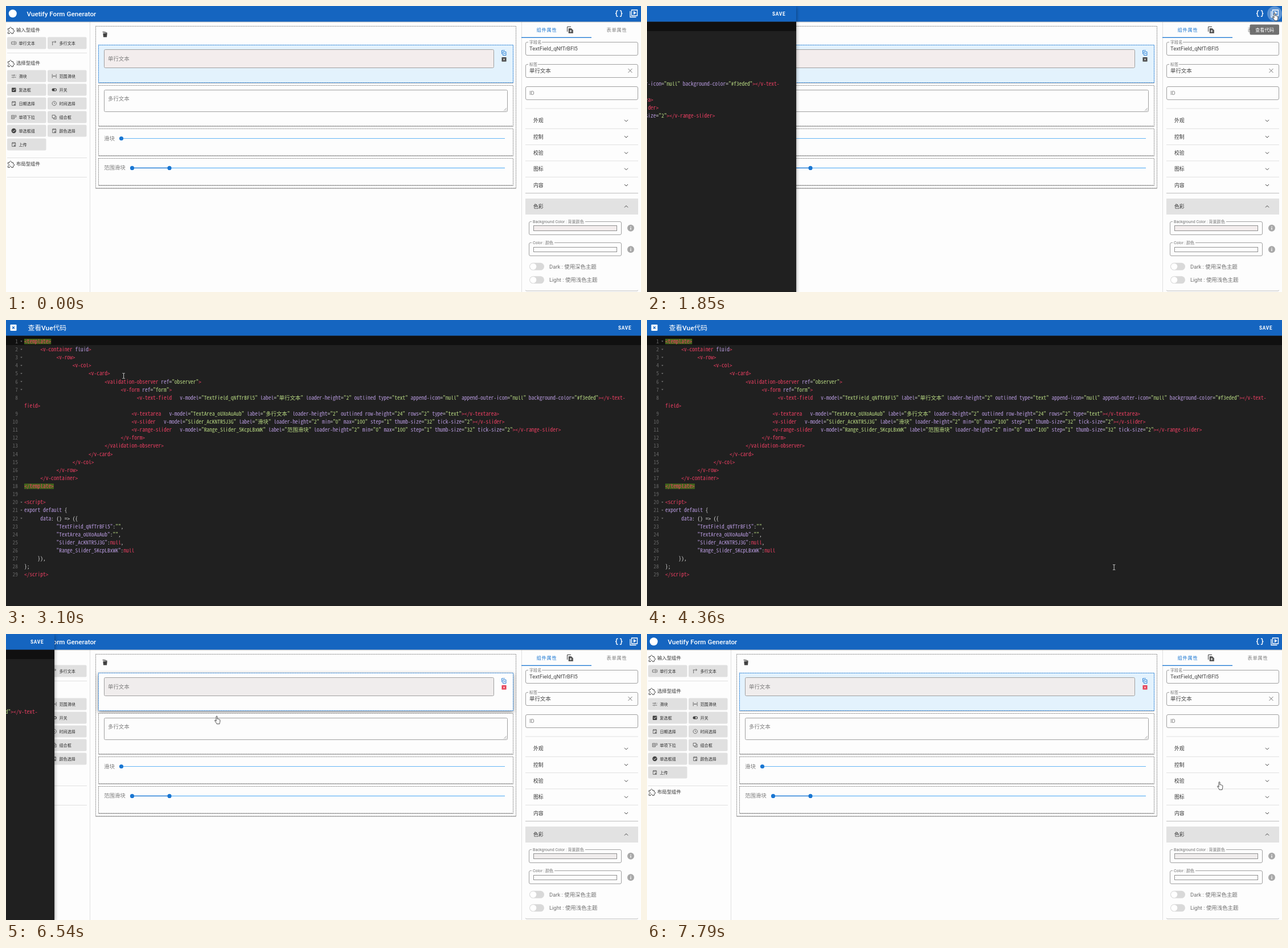
An HTML page for the animation above (8000 ms loop, 1115x502 px).

```html
<!DOCTYPE html>
<html lang="zh-CN">
<head>
<meta charset="utf-8">
<title>Form Generator</title>
<style>
  html, body { margin: 0; width: 100%; height: 100%; overflow: hidden; background: #fdfdfd; }
  svg { display: block; }
  text { font-family: Roboto, "Noto Sans CJK SC", "Noto Sans CJK", sans-serif; white-space: pre; }
  .code text { font-family: "Noto Sans Mono CJK SC", "Noto Sans Mono", monospace; font-size: 9.44px; }
  .shadow { filter: drop-shadow(0 1px .7px rgba(0,0,0,.25)); }
  .lift { filter: drop-shadow(0 2px 3px rgba(0,0,0,.45)); }
</style>
</head>
<body>
<svg id="stage" width="1115" height="502" viewBox="0 0 1115 502" xmlns="http://www.w3.org/2000/svg"></svg>
<script>
const BLUE = '#1565c0', PRIMARY = '#1976d2', INK = '#424242', GREY = '#7c7c7c', EDGE = '#a0a0a0', PAPER = '#fdfdfd';

const esc = s => s.replace(/&/g, '&amp;').replace(/</g, '&lt;');
const rect = (x, y, w, h, fill, more = '') =>
  `<rect x="${x}" y="${y}" width="${w}" height="${h}" fill="${fill}" ${more}/>`;
const line = (x1, y1, x2, y2, color, w = 1) =>
  `<path d="M${x1} ${y1}L${x2} ${y2}" stroke="${color}" stroke-width="${w}"/>`;
const dot = (x, y, r, fill) => `<circle cx="${x}" cy="${y}" r="${r}" fill="${fill}"/>`;
const text = (x, y, s, size, fill, more = '') =>
  `<text x="${x}" y="${y}" font-size="${size}" fill="${fill}" ${more}>${esc(s)}</text>`;
const group = (id, body, more = '') => `<g id="${id}" ${more}>${body}</g>`;
const icon = (x, y, d, color = INK, fill = 'none', w = 1) =>
  `<path transform="translate(${x} ${y})" d="${d}" fill="${fill}" stroke="${color}" stroke-width="${w}"/>`;

const SPACED = 'font-weight="500" letter-spacing=".74"';

// Icons are centred on 0,0
const shape = {
  puzzle: 'M-5-3h3c-1-3 4-3 3 0h3v3c3-1 3 4 0 3v3h-3c1-3-4-3-3 0h-3v-3c3 1 3-4 0-3z',
  field: 'M0-2h-4v4h4M1-3.5v7M2-2h2v4h-2',
  area: 'M-3 4v-6h6M1-4l2 2-2 2M-4-2h1',
  slide: 'M-4-1.5h5M3-1.5h1M1-3v3M-4 2h2M0 2h4M-1 .5v3',
  range: 'M-3.5-3.5v7M3.5-3.5v7M-2 0h4M-1-1l-1 1 1 1M1-1l1 1-1 1',
  date: 'M-3-3h6v6.5h-6zM-3-2h6M-1.7-4v1M1.7-4v1M.5 1h1.5v1.5h-1.5z',
  clock: 'M0-3.7a3.7 3.7 0 1 0 .1 0M0-2v2l1.6 1',
  list: 'M-4-3h5v6h-5zM-3-1h3M-3 1h3M2-3h2v3h-2',
  combo: 'M-3.5-3.5h5v5h-5zM-1 2v1.5h4.5v-5h-1.5',
  copy: 'M-1.5-1.5h5.5v6h-5.5zM-3.5 2.5v-6.5h5.5M0 1.5h3',
  cross: 'M-2-2l4 4M2-2l-4 4',
  brace: 'M3-5h-1.2q-1.4 0-1.4 1.4v1.800q0 1.800-1.800 1.800 1.800 0 1.800 1.800v1.800q0 1.400 1.400 1.400h1.200',
  down: 'M-3-1.5l3 3 3-3',
  up: 'M-3 1.5l3-3 3 3'
};

function tool(x, y, kind, label) {
  let mark;
  if (kind === 'check') mark = rect(x + 8, y - 3.5, 7.5, 7.5, INK, 'rx="1"') + icon(x + 11.7, y, 'M-2 0l1.5 1.5 3-3', '#fff');
  else if (kind === 'radio') mark = dot(x + 11.7, y, 4.2, INK) + icon(x + 11.7, y, 'M-2 0l1.5 1.5 3-3', '#fff');
  else if (kind === 'switch') mark = rect(x + 7.5, y - 2.5, 8.5, 5, INK, 'rx="2.5"') + dot(x + 13.4, y, 1.5, '#e0e0e0');
  else mark = icon(x + 11.7, y, shape[kind], '#555', 'none', .8);
  return rect(x, y - 10.5, 68.5, 21, '#e0e0e0', 'rx="2"') + mark + text(x + 20.5, y + 2.6, label, 7.08, '#2a2a2a');
}

function sidebar() {
  const rows = [
    [65, 'field', '单行文本', 'area', '多行文本'],
    [123, 'slide', '滑块', 'range', '范围滑块'],
    [147, 'check', '复选框', 'switch', '开关'],
    [171, 'date', '日期选择', 'clock', '时间选择'],
    [195, 'list', '单项下拉', 'combo', '组合框'],
    [219, 'radio', '单选框组', 'date', '颜色选择'],
    [243, 'date', '上传']
  ];
  let out = line(147.5, 28, 147.5, 502, '#e0e0e0');
  for (const [y, s] of [[42, '输入型组件'], [100, '选择型组件'], [277, '布局型组件']])
    out += icon(8.5, y + .5, shape.puzzle, INK, 'none', .9) + text(18, y + 3.2, s, 8.4, '#333');
  for (const y of [82.5, 266.5, 300.5]) out += line(2, y, 142, y, '#e0e0e0');
  for (const [y, a, s, b, t] of rows) out += tool(2, y, a, s) + (b ? tool(73, y, b, t) : '');
  return out;
}

// The shadow lies under a plain sheet, so the gaps between the dashes stay clear
const sheet = (x, y, w, h, edge = '#8a8a8a', fill = PAPER, ids = ['', '']) =>
  rect(x, y, w + 1, h + 1, fill, `class="shadow" ${ids[0]}`) +
  rect(x + .5, y + .5, w, h, 'none', `stroke="${edge}" stroke-dasharray="2 1" ${ids[1]}`);

function canvasArea() {
  const track = (x, y) => line(x, y, 876, y, '#64b5f6', 1.1);
  return sheet(157, 35, 738, 284) +
    icon(174, 49.5, 'M-3.5-1.5h7l-.6 6.5h-5.8zM-4-4.5l7.5 1.8-.3 1-7.5-1.8zM-1.5-5l2.5.6', INK, INK, .3) +
    sheet(162, 68, 728, 66, PRIMARY, '#e3f2fd', ['id="rowBox"', '']) +
    rect(172.5, 76.5, 684, 32, '#f3eded', `class="tint" rx="2" stroke="${EDGE}"`) +
    text(179, 95.5, '单行文本', 9.44, GREY) +
    icon(874, 82, shape.copy, PRIMARY, 'none', .9) +
    rect(870.5, 90, 8, 7.6, INK, 'id="remove" rx=".6"') + icon(874.5, 93.8, 'M-1.8-1.8l3.6 3.6M1.8-1.8l-3.6 3.6', '#fff') +
    sheet(162, 139, 728, 71) + rect(172.5, 147.5, 708, 38, PAPER, `rx="2" stroke="${EDGE}"`) +
    text(179, 166, '多行文本', 9.44, GREY) + icon(877, 182, 'M-3 2l5-5M0 2l2-2', GREY, 'none', .7) +
    sheet(162, 215, 728, 47) + text(172, 235.6, '滑块', 9.44, GREY) + track(203, 232.5) + dot(202.5, 232.5, 3.6, PRIMARY) +
    sheet(162, 267, 728, 47) + text(172, 287.4, '范围滑块', 9.44, GREY) + track(221, 284.4) +
    line(221, 284.4, 287, 284.4, PRIMARY, 1.3) + dot(221.5, 284.4, 3.6, PRIMARY) + dot(287, 284.4, 3.6, PRIMARY);
}

function input(id, x, y, w, label, labelW) {
  return rect(x + .5, y + .5, w, 23, PAPER, `id="${id}" rx="2.5" stroke="${EDGE}"`) +
    (label ? rect(x + 5, y - 1, labelW, 4, PAPER) + text(x + 7, y + 2.7, label, 7.08, '#707070') : '');
}

function panel() {
  let out = rect(906, 28, 209, 474, PAPER) + line(905.5, 28, 905.5, 502, '#e0e0e0') +
    text(931.5, 45.4, '组件属性', 8.26, PRIMARY, SPACED) + text(1054.5, 45.4, '表单属性', 8.26, GREY, SPACED) +
    rect(905, 54.7, 123, 1.3, PRIMARY) +
    icon(991, 43, 'M-3-3.5h4.5l3 3v5h-7.5z', INK, '#555', .6) + icon(990, 42, 'M-4.5 3v-8.500h6.500', INK, 'none', 1) +
    icon(991.5, 43.5, 'M-2 .5h4M0-1.5v4', '#fff', 'none', .9) +
    input('nameBox', 912, 63, 197, '字段名', 24) + text(919, 78, 'TextField_qNfTrBFl5', 9.44, '#444') +
    input('labelBox', 912, 102, 197, '标签', 17) + text(919, 116.8, '单行文本', 9.44, '#444') +
    icon(1096, 113.5, 'M-3.5-3.5l7 7M3.5-3.5l-7 7', '#666', 'none', .9) +
    input('idBox', 912, 141, 197) + text(919, 155.8, 'ID', 9.44, GREY) +
    line(912, 180, 1110, 180, '#e0e0e0') + rect(912, 187, 198, 141, PAPER, 'class="shadow"');
  ['外观', '控制', '校验', '图标', '内容'].forEach((s, i) => {
    const y = 201 + i * 28.3;
    if (i) out += line(912, y - 14, 1110, y - 14, '#e0e0e0');
    out += text(926, y + 3.3, s, 8.85, '#333') + icon(1089, y + .3, shape.down, INK);
  });
  out += rect(912, 338, 198, 161.5, PAPER, 'class="shadow" rx="2"') + rect(912, 338, 198, 28, '#e2e2e2') +
    text(926, 355.2, '色彩', 8.85, '#333') + icon(1089, 352, shape.up, INK);
  const info = y => dot(1097, y, 6, '#a8a8a8') + rect(1096.3, y - .7, 1.4, 3.7, '#fff') + rect(1096.3, y - 3, 1.4, 1.4, '#fff');
  out += input('bgBox', 918, 378, 162, 'Background Color : 背景颜色', 94) +
    rect(926.5, 385.5, 146, 9, '#f3eded', 'class="tint" stroke="#909090"') + info(389.7) +
    input('colorBox', 918, 415, 162, 'Color : 颜色', 40) +
    rect(926.5, 423.5, 146, 8, '#fff', 'stroke="#909090"') + info(427.3);
  for (const [y, s] of [[457.3, 'Dark : 使用深色主题'], [480.8, 'Light : 使用浅色主题']])
    out += rect(919, y - 6.5, 26, 13, '#d9d9d9', 'rx="6.5"') + dot(925.7, y, 5.6, '#fff') + text(954, y + 3.4, s, 9.44, '#707070');
  return out;
}

function topBar() {
  return rect(0, 0, 1115, 27.5, BLUE, 'class="shadow"') + dot(11.8, 13.3, 7, '#fff') +
    text(36.5, 17.6, 'Vuetify Form Generator', 11.7, '#fff', 'font-weight="500"') +
    group('glow', dot(1102, 13.5, 13, 'rgba(255,255,255,.3)')) +
    icon(1071.5, 13.3, shape.brace, '#fff', 'none', 1.4) +
    `<g transform="translate(2152.4 0) scale(-1 1)">${icon(1071.5, 13.3, shape.brace, '#fff', 'none', 1.4)}</g>` +
    icon(1103, 12, 'M-4.5-5h10v10h-10zM-7-3v10.5h10.5', '#fff', 'none', 1.3) + icon(1103.5, 12, 'M-1.5-3l4.5 3-4.5 3z', '#fff', '#fff', .3);
}

const open = ['<template>', 'v-container fluid', 'v-row', 'v-col', 'v-card', 'validation-observer ref="observer"', 'v-form ref="form"'];
const pad = n => ' '.repeat(n);
const source = [
  ...open.map((s, i) => pad(i * 6) + (i ? `<${s}>` : s)),
  pad(42) + '<v-text-field   v-model="TextField_qNfTrBFl5" label="单行文本" loader-height="2" outlined type="text" append-icon="null" append-outer-icon="null" background-color="#f3eded"></v-text-',
  'field>',
  pad(40) + '<v-textarea   v-model="TextArea_oUXoAuAub" label="多行文本" loader-height="2" outlined row-height="24" rows="2" type="text"></v-textarea>',
  pad(40) + '<v-slider   v-model="Slider_AcKNTR5J3G" label="滑块" loader-height="2" min="0" max="100" step="1" thumb-size="32" tick-size="2"></v-slider>',
  pad(40) + '<v-range-slider   v-model="Range_Slider_5KcpLBxWK" label="范围滑块" loader-height="2" min="0" max="100" step="1" thumb-size="32" tick-size="2"></v-range-slider>',
  ...open.slice(1).map((s, i) => pad(i * 6 + 6) + `</${s.split(' ')[0]}>`).reverse(),
  '</template>', '', '<script>', 'export default {', pad(6) + 'data: () => ({',
  pad(12) + '"TextField_qNfTrBFl5":"",', pad(12) + '"TextArea_oUXoAuAub":"",',
  pad(12) + '"Slider_AcKNTR5J3G":null,', pad(12) + '"Range_Slider_5KcpLBxWK":null',
  pad(5) + '}),', '};', '<\/script>'
];

// Groups: punctuation, tag, attribute or key, string
const TOKEN = /(=>|[={}():;,]|\s+)|(<\/?[a-z-]+>?|>|^field>|null)|("[^"]*"(?=:)|[a-z][a-z-]*)|("[^"]*")/g;
const HUES = ['#e0e0e0', '#ec3f62', '#b79ade', '#b9da83'];
const paint = s => [...s.matchAll(TOKEN)].map(m =>
  `<tspan fill="${HUES[m.slice(1).findIndex(Boolean)]}">${esc(m[0])}</tspan>`).join('');

function editor() {
  const rowY = i => 37.6 + i * 14.12;
  let out = rect(0, 27, 1117, 475, '#202020') + rect(0, 28, 1117, 16, '#101010'), n = 0;
  source.forEach((s, i) => {
    const y = rowY(i), base = y + 3.3;
    if (s !== 'field>') {
      n++;
      out += text(21, base, String(n), 9.44, '#666', 'text-anchor="end"');
      if (n < 8 || (n > 19 && n < 23)) out += icon(27, y, 'M-1.5-1h3l-1.5 2z', '#777', '#777', .2);
    }
    if (/template/.test(s)) out += rect(32, y - 4.6, s.length * 4.72, 9.4, '#42661c');
    out += `<text x="32" y="${base}" xml:space="preserve">${paint(s)}</text>`;
  });
  return group('lines', out, 'class="code"') + rect(0, 0, 1117, 27.5, BLUE) +
    group('closeGlow', dot(13, 13.5, 14, 'rgba(255,255,255,.16)')) +
    rect(7.5, 8, 11, 11, '#fff', 'rx="1.2"') + icon(13, 13.5, shape.cross, BLUE, 'none', 1.3) +
    text(38.5, 17.8, '查看Vue代码', 11.8, '#fff', 'font-weight="500"') +
    text(1075, 16.7, 'SAVE', 8.26, '#fff', 'font-weight="700" letter-spacing=".74"');
}

const pointers =
  group('arrow', '<path d="M.5.5v12.5l3-2.6 2 4.4 2-.9-2-4.3h4.3z" fill="#fff" stroke="#000" stroke-width=".9"/>') +
  group('hand', '<path d="M3 9.5V1.7c0-1.6 2-1.6 2 0v4c.5-.5 1.6-.4 1.7.4.6-.5 1.5-.2 1.6.5.7-.4 1.5 0 1.5.8v3c0 1-.8 2-.8 3.9H4C3.6 12.4 1.2 10.200.6 8.700c-.3-1 1-1.400 1.500-.6z" fill="#fff" stroke="#222" stroke-width=".8"/>') +
  group('beam', '<path d="M.5.5h1.5l.6.5.6-.5h1.5M2.6 1v8M.5 9.5h1.5l.6-.5.6.5h1.5" fill="none" stroke="#ddd" stroke-width=".9"/>');

const stage = document.getElementById('stage');
stage.innerHTML = sidebar() + canvasArea() + panel() + topBar() +
  group('tip', rect(1058.5, 32.5, 51.5, 18, 'rgba(97,97,97,.9)', 'rx="2"') + text(1068, 44.6, '查看代码', 8.26, '#fff')) +
  group('dialog', rect(0, 0, 1117, 502, '#202020', 'class="lift"') + editor()) + pointers;

// start ms, pointer, x, y, changed state
const steps = [
  [0], [590, 'arrow', 1098, 241], [910, 'hand', 1098, 110, { hover: 'labelBox' }], [1230],
  [1550, 'hand', 1098, 11.5, { tip: .8 }], [1850, 'hand', 1098, 11.5, { tip: 1, dialog: -855 }],
  [2170, 'hand', 1095.5, 15, { dialog: 0 }],
  [2490, 'beam', 748, 166], [2790, 'beam', 483, 125], [3100, 'beam', 204, 93], [3420, 'beam', 226, 207],
  [3720, 'beam', 472, 119], [4040, 'beam', 233, 115], [4360, 'beam', 817.5, 429], [4680, 'beam', 936, 273],
  [5000, 'beam', 316, 175], [5290, 'beam', 101, 20], [5600, 'beam', 93, 27], [5920, 'arrow', 14, 21],
  [6220, 'hand', 7, 12.5, { closing: true }],
  [6540, 'hand', 366, 143.5, { dialog: -1032, lifted: true }],
  [6850, 'hand', 996, 208], [7170, 'arrow', 1012, 404, { hover: 'bgBox' }],
  [7470, 'hand', 1013, 371, { hover: 'bgBox' }], [7790, 'hand', 1001, 259]
];

const $ = id => document.getElementById(id);
const show = (id, on) => { $(id).style.display = on ? '' : 'none'; };
const tints = document.querySelectorAll('.tint');
let shown = null;

function apply(step) {
  const [t, kind, x, y, s = {}] = step;
  const covered = t >= 2170 && t < 6540, late = t >= 6540;
  for (const id of ['arrow', 'hand', 'beam']) show(id, id === kind);
  if (kind) $(kind).setAttribute('transform', `translate(${x} ${y})`);
  show('dialog', covered || s.dialog !== undefined);
  $('dialog').setAttribute('transform', `translate(${s.dialog || 0} 0)`);
  show('tip', s.tip);
  show('glow', s.tip);
  $('tip').setAttribute('transform', `translate(1084 41) scale(${s.tip || 1}) translate(-1084 -41)`);
  $('tip').setAttribute('opacity', s.tip < 1 ? .6 : 1);
  show('closeGlow', s.closing);
  for (const id of ['labelBox', 'bgBox']) $(id).setAttribute('stroke', s.hover === id ? '#222' : EDGE);
  $('rowBox').setAttribute('fill', s.lifted ? PAPER : '#e3f2fd');
  $('rowBox').setAttribute('class', s.lifted ? 'lift' : 'shadow');
  $('remove').setAttribute('fill', late ? '#e5394f' : INK);
  tints.forEach(el => el.setAttribute('fill', late ? '#f0eded' : '#f3eded'));
}

function tick() {
  const t = performance.now() % 8000;
  const step = steps.findLast(s => s[0] <= t);
  if (step !== shown) apply(shown = step);
  requestAnimationFrame(tick);
}
tick();
</script>
</body>
</html>
```
